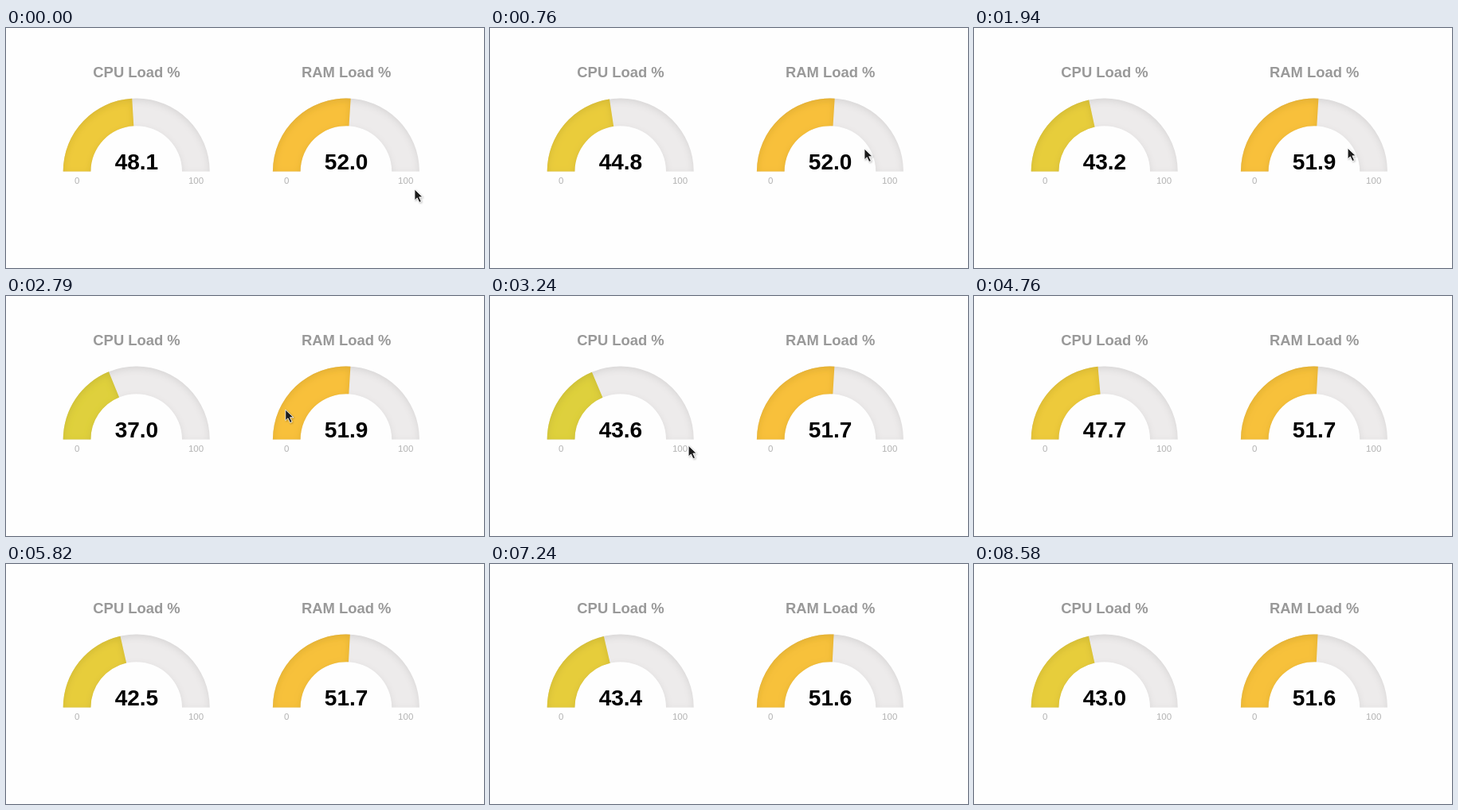
These frames come from a looping animation (600x302 px, 8.73 s). An HTML page:

```html
<!DOCTYPE html>
<html lang="en">
<head>
<meta charset="utf-8">
<title>Load gauges</title>
<style>
  html, body { margin: 0; width: 100%; height: 100%; overflow: hidden; background: #fefefe; }
  svg { display: block; width: 600px; height: 302px; }
  text { font-family: "Liberation Sans", Arial, sans-serif; text-anchor: middle; }
  .title { font-size: 18.4px; font-weight: bold; fill: #999; }
  .value { font-size: 28px; font-weight: bold; fill: #000; }
  .limit { font-size: 11.5px; fill: #b3b3b3; }
  .band { filter: url(#inset); }
</style>
</head>
<body>
<svg id="stage" viewBox="0 0 600 302">
  <defs>
    <filter id="inset">
      <feOffset dy="3"/>
      <feGaussianBlur stdDeviation="5" result="blur"/>
      <feComposite operator="out" in="SourceGraphic" in2="blur" result="inverse"/>
      <feFlood flood-color="black" flood-opacity=".2" result="tint"/>
      <feComposite operator="in" in="tint" in2="inverse" result="shade"/>
      <feComposite operator="over" in="shade" in2="SourceGraphic"/>
    </filter>
    <filter id="drop" x="-50%" y="-50%" width="200%" height="200%">
      <feDropShadow dx="1" dy="1" stdDeviation="1" flood-opacity=".3"/>
    </filter>
  </defs>
  <g id="gauges"></g>
  <path id="cursor" d="M0 0V13.6L3.2 10.7L5.8 16.4L8.3 15.3L5.7 9.7H10Z"
        fill="#1c1c1e" stroke="#fff" stroke-width=".8" filter="url(#drop)"/>
</svg>
<script>
const LOOP = 8730, FIRST = 240, PERIOD = 1000, GLIDE = 700;
const OUTER = 92, INNER = 57.3, BASE = 180.5;

// [load, red, green, blue]
const COLORS = [[37, 222, 208, 60], [48, 238, 202, 58], [52, 248, 192, 58]];

// [ms, x, y]
const TRAIL = [
  [0, 513, 203], [250, 507, 221], [760, 470, 152], [2150, 469, 151],
  [2790, 351, 143], [3030, 300, 161], [3640, 153, 240], [3880, 60, 286],
  [4000, 56, 288]
];
const CURSOR_GONE = 4210;

const lerp = (a, b, k) => a + (b - a) * k;

function sample(table, x) {
  let i = 1;
  while (i < table.length - 1 && table[i][0] < x) i++;
  const a = table[i - 1], b = table[i];
  const k = Math.min(1, Math.max(0, (x - a[0]) / (b[0] - a[0])));
  return a.slice(1).map((v, j) => lerp(v, b[j + 1], k));
}

function add(parent, tag, attrs, text = "") {
  const el = document.createElementNS("http://www.w3.org/2000/svg", tag);
  for (const name in attrs) el.setAttribute(name, attrs[name]);
  el.textContent = text;
  return parent.appendChild(el);
}

function band(cx, load) {
  const angle = Math.PI * (1 - load / 100);
  const at = r => `${cx + r * Math.cos(angle)} ${BASE - r * Math.sin(angle)}`;
  return `M${cx - INNER} ${BASE}H${cx - OUTER}A${OUTER} ${OUTER} 0 0 1 ${at(OUTER)}` +
         `L${at(INNER)}A${INNER} ${INNER} 0 0 0 ${cx - INNER} ${BASE}Z`;
}

function makeGauge(cx, title, loads) {
  const g = document.getElementById("gauges");
  const label = (cls, x, y, text) => add(g, "text", { class: cls, x, y }, text);
  add(g, "path", { class: "band", d: band(cx, 100), fill: "#edebeb" });
  const level = add(g, "path", { class: "band" });
  label("title", cx + .3, 61.5, title);
  const value = label("value", cx + .2, 178, "");
  label("limit", cx - 74.6, 196, "0");
  label("limit", cx + 74.8, 196, "100");

  return t => {
    const step = Math.floor((t - FIRST) / PERIOD) + 1;
    const since = t - FIRST - (step - 1) * PERIOD;
    const ease = Math.min(1, since / GLIDE) ** .48;
    const load = lerp(loads[Math.max(0, step - 1)], loads[step], ease);
    level.setAttribute("d", band(cx, load));
    level.setAttribute("fill", `rgb(${sample(COLORS, load).map(Math.round)})`);
    value.textContent = loads[step].toFixed(1);
  };
}

const gauges = [
  makeGauge(163.7, "CPU Load %", [48.1, 44.8, 43.2, 37, 43.6, 47.7, 42.5, 42.7, 43.4, 43]),
  makeGauge(426.9, "RAM Load %", [52, 52, 51.9, 51.9, 51.7, 51.7, 51.7, 51.6, 51.6, 51.6])
];
const cursor = document.getElementById("cursor");

function draw() {
  const t = performance.now() % LOOP;
  gauges.forEach(update => update(t));
  cursor.setAttribute("transform", `translate(${sample(TRAIL, t)})`);
  cursor.setAttribute("visibility", t < CURSOR_GONE ? "visible" : "hidden");
  requestAnimationFrame(draw);
}
draw();
</script>
</body>
</html>
```
